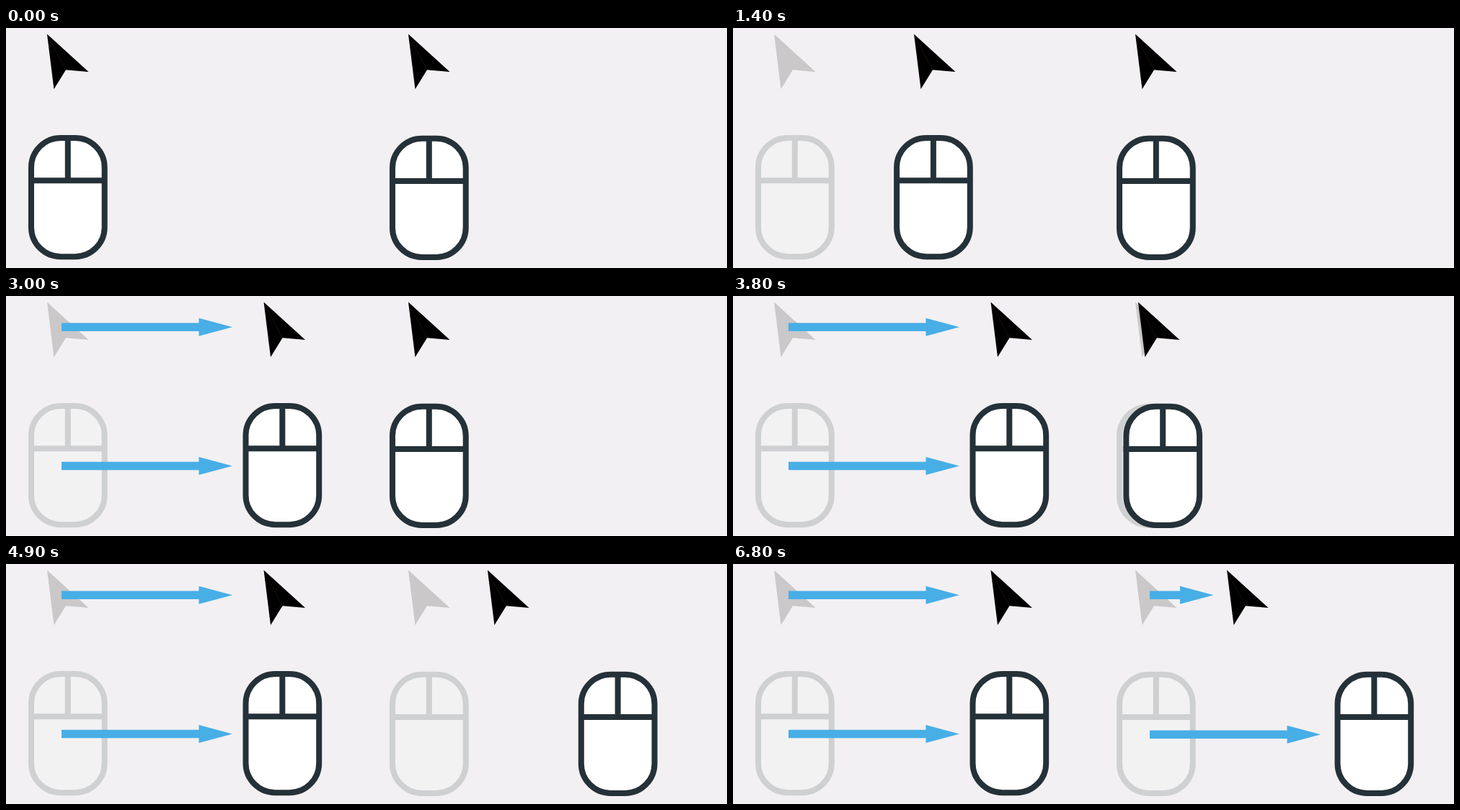
Recreate the animation shown at these times as an HTML page with a canvas. Size 1000 by 334 pixels, loop 7.2 s.

```html
<!DOCTYPE html>
<html lang="en">
<head>
<meta charset="utf-8">
<title>Pointer travel</title>
<style>
  html, body { margin: 0; width: 100%; height: 100%; overflow: hidden; background: #f2f0f2; }
  canvas { display: block; width: 1000px; height: 334px; }
</style>
</head>
<body>
<canvas id="stage" width="1000" height="334"></canvas>
<script>
const ctx = document.getElementById('stage').getContext('2d');
const LOOP = 7200, STEP = 100, TRAVEL = 1950, WIPE = 500;

const SOLID = { line: '#253138', fill: '#ffffff', pointer: '#000000', crease: '#1d0f0c' };
const GHOST = { line: '#cfd0d2', fill: '#f3f2f3', pointer: '#cac8c9' };
const BLUE = '#48aee6';

// Each side: origin, start of travel, arrow reveal, distances, arrow lengths
const sides = [
  { x: 0, y: 0, start: 271, reveal: 2420, mouse: 297.5, pointer: 300.5, arrows: [237, 237] },
  { x: 501, y: 0.7, start: 3491, reveal: 5620, mouse: 302.5, pointer: 127, arrows: [88.5, 237] }
];

const clamp = v => Math.min(1, Math.max(0, v));
const ease = u => u * u * u * (10 - 15 * u + 6 * u * u);

function polygon(points, color) {
  ctx.beginPath();
  points.forEach(([x, y]) => ctx.lineTo(x, y));
  ctx.closePath();
  ctx.fillStyle = color;
  ctx.fill();
}

function drawPointer(x, style) {
  polygon([[x + 57, 8.5], [x + 114.5, 61], [x + 83, 58.3], [x + 66.5, 85]], style.pointer);
  if (!style.crease) return;
  ctx.beginPath();
  ctx.moveTo(x + 59, 13);
  ctx.lineTo(x + 82.5, 57.5);
  ctx.strokeStyle = style.crease;
  ctx.lineWidth = 1;
  ctx.stroke();
}

function drawMouse(x, y, style) {
  ctx.beginPath();
  ctx.roundRect(x + 35, y + 153, 101.7, 165.2, 41);
  ctx.fillStyle = style.fill;
  ctx.fill();
  ctx.moveTo(x + 35, y + 212.2);
  ctx.lineTo(x + 136.7, y + 212.2);
  ctx.moveTo(x + 85.8, y + 153);
  ctx.lineTo(x + 85.8, y + 212.2);
  ctx.strokeStyle = style.line;
  ctx.lineWidth = 8;
  ctx.stroke();
}

function drawArrow(x, y, length, shown) {
  if (shown <= 0) return;
  const tip = x + length, neck = tip - 46.5;
  ctx.save();
  ctx.beginPath();
  ctx.rect(x, y - 20, length * shown, 40);
  ctx.clip();
  polygon([
    [x, y - 5.8], [neck, y - 5.8], [neck, y - 12.5], [tip, y],
    [neck, y + 12.5], [neck, y + 5.8], [x, y + 5.8]
  ], BLUE);
  ctx.restore();
}

function drawSide(side, t) {
  const moved = ease(clamp((t - side.start) / TRAVEL));
  const shown = clamp((t - side.reveal) / WIPE);
  drawPointer(side.x, GHOST);
  drawMouse(side.x, side.y, GHOST);
  drawPointer(side.x + side.pointer * moved, SOLID);
  drawMouse(side.x + side.mouse * moved, side.y, SOLID);
  drawArrow(side.x + 77, 43.2, side.arrows[0], shown);
  drawArrow(side.x + 77, 236.5 + side.y, side.arrows[1], shown);
}

function draw(t) {
  ctx.fillStyle = '#f2f0f2';
  ctx.fillRect(0, 0, 1000, 334);
  ctx.fillStyle = '#f7f8f8';
  ctx.fillRect(0, 333, 1000, 1);
  sides.forEach(side => drawSide(side, t));
}

function tick() {
  const t = performance.now() % LOOP;
  draw(Math.floor(t / STEP) * STEP);
  requestAnimationFrame(tick);
}
tick();
</script>
</body>
</html>
```
